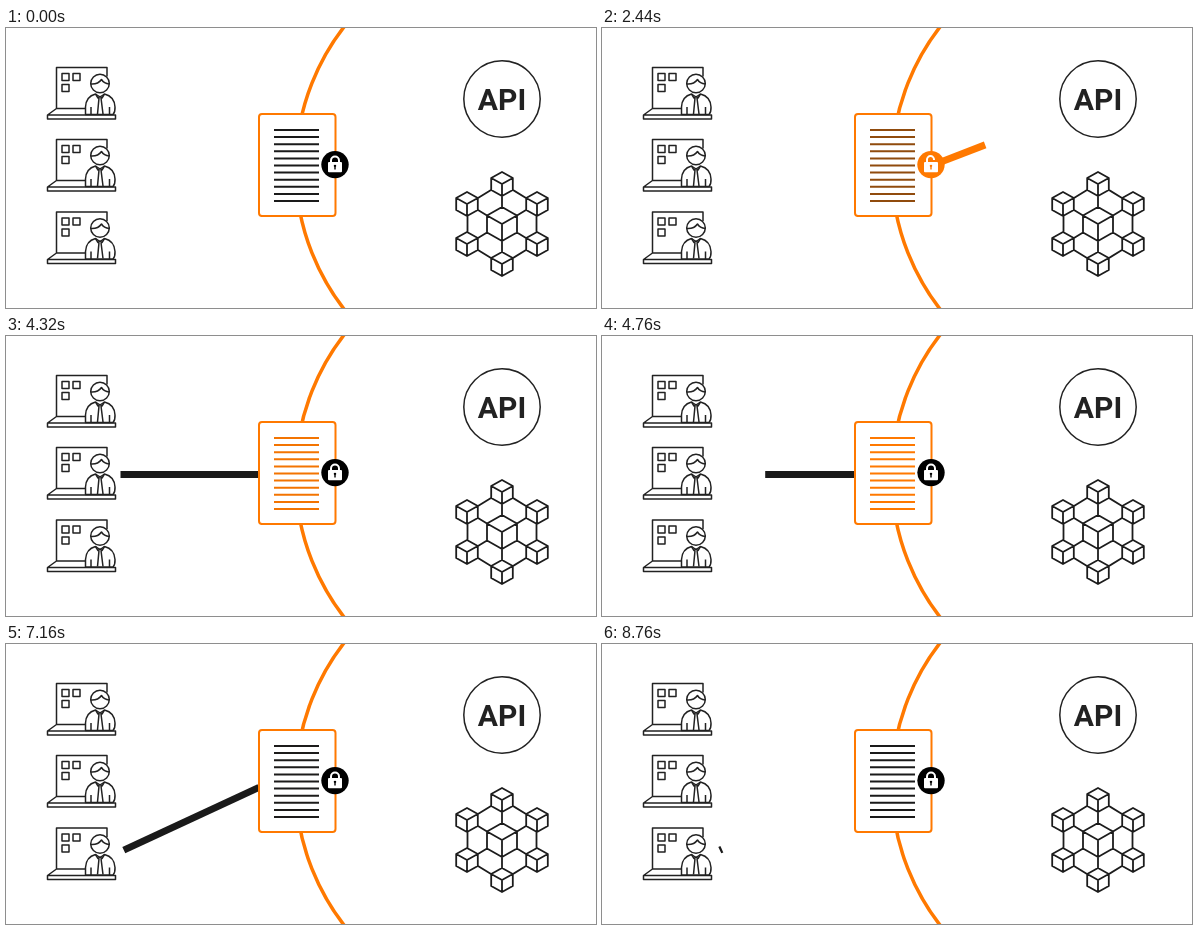
Write an HTML page that moves like this. It is 590 px wide and 280 px high and loops after 8.8 s.

```html
<!DOCTYPE html>
<html lang="en">
<head>
<meta charset="utf-8">
<title>Secured document access</title>
<style>
  html, body { margin: 0; width: 100%; height: 100%; overflow: hidden; background: #fff; }
  svg { display: block; width: 100vw; height: 100vh; }
  .ink { fill: none; stroke: #222; stroke-width: 1.5; stroke-linejoin: round; }
  .mesh { fill: none; stroke: #1c1c1c; stroke-width: 1.8; stroke-linejoin: round; }
  .beam { fill: none; stroke-width: 7; }
  text { font: 700 30px Roboto, "Liberation Sans", sans-serif; fill: #222; text-anchor: middle; }
</style>
</head>
<body>
<svg viewBox="0 0 590 280">
  <defs>
    <g id="user" class="ink">
      <path d="M50.5 80.5V39.5H101V48.5M50.5 80.5H79.5M50.5 80.5L41.5 87V91H109.5V87H41.5Z"/>
      <path d="M56 45.5h7v7h-7zM67 45.5h7v7h-7zM56 56.5h7v7h-7z"/>
      <circle cx="94" cy="55.5" r="9.3" fill="#fff"/>
      <path d="M84.8 56Q92 56.5 95.5 51.5Q98 55.5 103.2 56"/>
      <path d="M79.5 86.5V79Q80 68.5 89.5 66L94 69L98.500 66Q108.500 68.500 109 79Q109.300 84 107 86.500Z" fill="#fff"/>
      <path d="M85 86.500V79M103.500 86.500V79M89.500 66L92 70L94 68.500L96 70L98.500 66M93 70L91.500 86M95 70L97 86"/>
    </g>
  </defs>

  <use href="#user"/>
  <use href="#user" y="72"/>
  <use href="#user" y="144.500"/>

  <circle cx="519.700" cy="140" r="230" fill="none" stroke="#ff7900" stroke-width="3.500"/>
  <rect x="400" width="190" height="280" fill="#fff"/>

  <circle class="ink" cx="496" cy="71" r="38.200"/>
  <text x="496" y="81.500">API</text>
  <path id="chain" class="mesh"/>

  <path id="inBeam" class="beam" stroke="#1a1a1a"/>
  <path id="outBeam" class="beam" stroke="#ff7900"/>

  <rect x="253" y="86" width="76.500" height="102" rx="3" fill="#fff" stroke="#ff7900" stroke-width="2"/>
  <path id="rows" fill="none" stroke-width="2"/>

  <g transform="translate(329 136.600)">
    <circle id="badge" r="13.700"/>
    <rect x="-7" y="-2.600" width="14" height="10.300" rx="1" fill="#fff"/>
    <g fill="none" stroke="#fff" stroke-width="2">
      <path id="shut" d="M-4-2V-4a4 4 0 0 1 8 0V-2"/>
      <path id="open" d="M-4-2V-5a3.500 3.500 0 0 1 7 0V-4.500"/>
    </g>
    <path id="keyhole" d="M-1.300 1.500a1.300 1.300 0 1 1 2.600 0L.7 2.500V5H-.7V2.500Z"/>
  </g>
</svg>

<script>
const LOOP = 8800, CYCLE = 3000, FIRST = 350, MOVE = 600;
const INK = [26, 26, 26], BLACK = [0, 0, 0], ORANGE = [255, 121, 0];
const inputs = [
  [114.500, 64.500, 253, 131.500],
  [114.500, 138.400, 253, 138.400],
  [117.800, 206.200, 253, 143.300]
];
const outputs = [
  [331, 137, 438.500, 95.500],
  [331, 135.500, 431.500, 182.300]
];

const el = id => document.getElementById(id);
const ramp = (t, from, to) => Math.min(1, Math.max(0, (t - from) / (to - from)));
const wave = x => (1 - Math.cos(2 * Math.PI * x)) / 2;
const mix = (a, b, k) => `rgb(${a.map((v, i) => Math.round(v + (b[i] - v) * k))})`;

function cube(x, y, w, h) {
  const q = h / 2;
  return `M${x} ${y - h}l${w} ${q}v${h}l${-w} ${q}l${-w} ${-q}v${-h}z` +
         `M${x - w} ${y - q}l${w} ${q}l${w} ${-q}M${x} ${y}v${h}`;
}

function drawChain() {
  let d = cube(496, 196, 15, 17);
  for (const [x, y] of [[496, 156], [461, 176], [531, 176], [461, 216], [531, 216], [496, 236]])
    d += cube(x, y, 10.800, 12);
  d += "M496 168V179M496 213V224";
  for (const s of [-1, 1]) {
    const x = n => 496 + s * n;
    d += `M${x(11)} 162L${x(24)} 170M${x(11)} 230L${x(24)} 222M${x(34.500)} 188V204` +
         `M${x(24)} 182L${x(15)} 187.500M${x(24)} 210L${x(15)} 204.500`;
  }
  el("chain").setAttribute("d", d);
}

function drawRows() {
  let d = "";
  for (let i = 0; i < 11; i++) d += `M268 ${(102 + i * 7.100).toFixed(1)}H313`;
  el("rows").setAttribute("d", d);
}

// Shows the part of a beam between fractions a and b of its length.
function setBeam(node, line, a, b) {
  if (!line || b <= a) return node.setAttribute("d", "");
  const [x1, y1, x2, y2] = line;
  const at = k => `${x1 + (x2 - x1) * k} ${y1 + (y2 - y1) * k}`;
  node.setAttribute("d", `M${at(a)}L${at(b)}`);
}

function render(time) {
  const t = time % LOOP - FIRST;
  const n = Math.max(0, Math.floor(t / CYCLE));
  const denied = n === 2;
  const c = t - n * CYCLE;        // time since this request began
  const s = c - MOVE - 200;       // time since the check began

  const head = ramp(c, 0, MOVE);
  if (denied) setBeam(el("inBeam"), inputs[n], 0, Math.min(head, 1 - ramp(s, 900, 1622)));
  else setBeam(el("inBeam"), inputs[n], ramp(s, 400, 1000), head);
  setBeam(el("outBeam"), outputs[n], ramp(s, 1600, 2200), ramp(s, 1000, 1600));

  let glow = 0;
  if (s > 0 && s < 400) glow = wave(s / 400);
  else if (s >= 400) {
    const fade = denied ? ramp(s, 610, 890) : ramp(s, 1000, 1600);
    glow = wave(ramp(s, 400, 600) / 2) * (1 - fade);
  }
  el("rows").setAttribute("stroke", mix(INK, ORANGE, glow));

  const unlocked = denied ? 0 : ramp(s, 800, 1000) - ramp(s, 2000, 2200);
  const tone = mix(BLACK, ORANGE, unlocked);
  el("badge").setAttribute("fill", tone);
  el("keyhole").setAttribute("fill", tone);
  el("open").setAttribute("opacity", unlocked);
  el("shut").setAttribute("opacity", 1 - unlocked);
}

drawChain();
drawRows();
const start = performance.now();
function tick() {
  render(performance.now() - start);
  requestAnimationFrame(tick);
}
tick();
</script>
</body>
</html>
```
